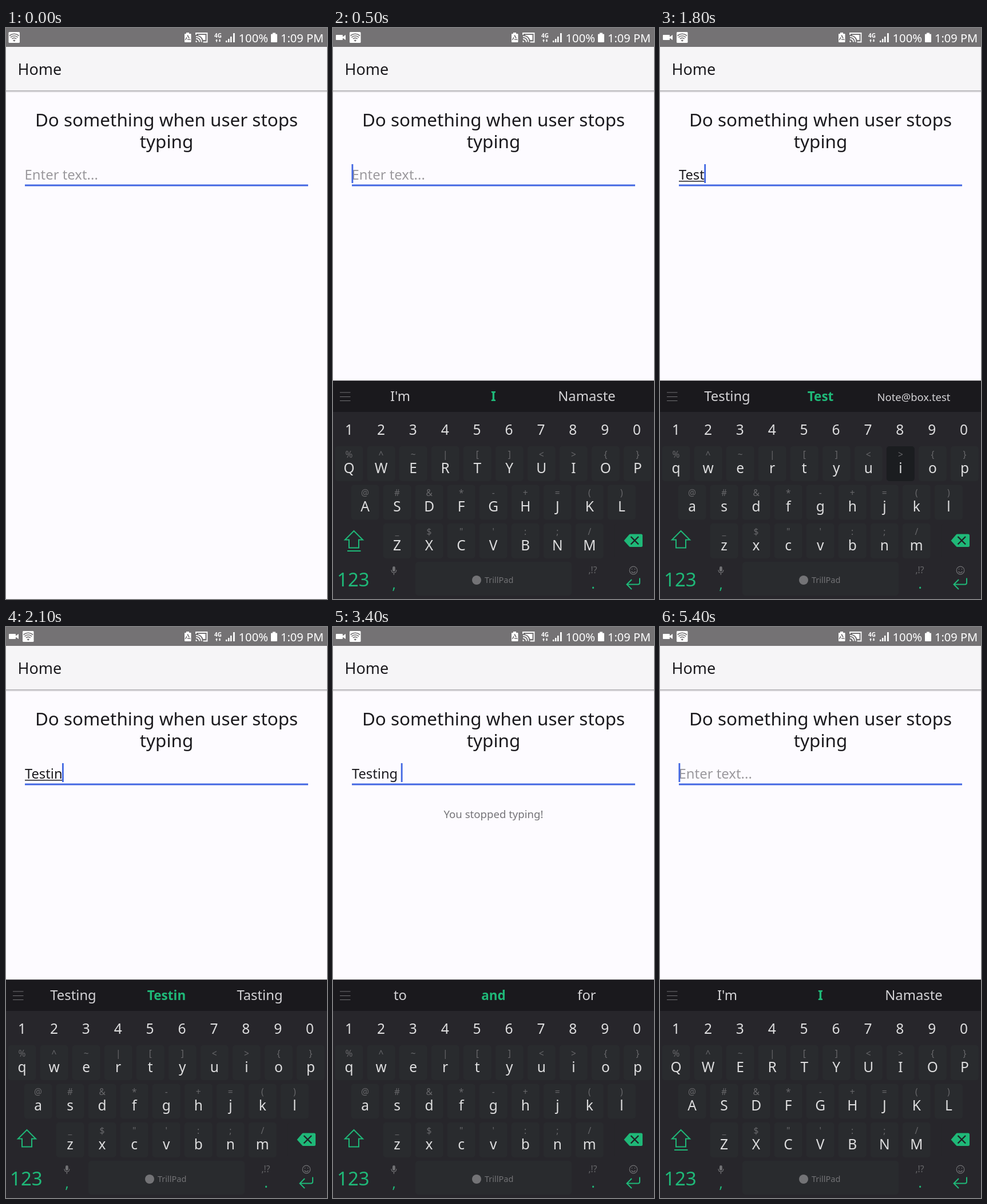
Animation, 561 px wide and 998 px high, one loop 5800 ms. Source, as an HTML page:

```html
<!DOCTYPE html>
<html lang="en">
<head>
<meta charset="utf-8">
<title>Typing pause demo</title>
<style>
  html, body { margin: 0; width: 100%; height: 100%; overflow: hidden; background: #fdfbff; }
  svg { display: block; }
  text { font-family: "Noto Sans", "Open Sans", sans-serif; white-space: pre; }
  .mid { text-anchor: middle; }
  .letter { font-size: 24.5px; fill: #dededf; }
  .symbol { font-size: 15.5px; fill: #68686b; }
  .brand { font-size: 14.5px; fill: #737376; }
  .green { fill: #1fb878; }
  .line { fill: none; stroke: #1fb878; stroke-width: 2; }
  .grey { fill: none; stroke: #717174; stroke-width: 1.2; }
</style>
</head>
<body>
<svg width="561" height="998" viewBox="0 0 561 998">
  <defs>
    <linearGradient id="shade" x2="0" y2="1">
      <stop stop-color="#aaa9ac"/><stop offset="1" stop-color="#fdfbff"/>
    </linearGradient>
  </defs>
  <rect width="561" height="998" fill="#fdfbff"/>

  <!-- status bar -->
  <rect width="561" height="33" fill="#747274"/>
  <path id="video" fill="#fff" d="M6 12h10q1 0 1 1v2.500l5-3.500v9l-5-3.500v2.500q0 1-1 1h-10q-1 0-1-1v-7q0-1 1-1z"/>
  <g id="wifi" fill="none" stroke="#747274" stroke-width="1.600">
    <rect x="4.500" y="7" width="19.500" height="19" rx="1.500" fill="#fff" stroke="none"/>
    <path d="M6 13.500q8.300-6.500 16.600 0M8 16.300q6.300-5 12.600 0M10.300 19q4-3.200 8 0"/>
    <path d="M12 21.200q2.300-1.600 4.600 0l-2.300 2.800z" fill="#747274" stroke="none"/>
  </g>
  <g fill="#fff">
    <path d="M315 8h5v2h2.500q1 0 1 1v13q0 1-1 1h-9.500q-1 0-1-1v-13q0-1 1-1h2z"/>
    <path d="M317.700 13.500l3.700 6.500h-7.400z" fill="none" stroke="#747274" stroke-width="1.700" stroke-dasharray="5 2"/>
    <path d="M332 12v-3h19.500v15.500h-7M332 14.800q9.500 .5 9.800 9.700M332 18.600q5.800 .4 6 5.900" fill="none" stroke="#fff" stroke-width="1.800"/>
    <path d="M336 12h12.500v9h-4q-2-6.500-8.500-8zM331.500 22q2.500 .2 2.700 2.700h-2.700z"/>
    <text x="364" y="17" font-size="10" font-weight="700">4G</text>
    <path d="M366 22l2-2.500 2 2.500h-1.200v2.500h-1.600v-2.500zM371.500 22h1.200v-2.500h1.600v2.500h1.200l-2 2.500z"/>
    <path d="M384 22h2.500v3h-2.500zM388 19h2.500v6h-2.500zM392 15h2.500v10h-2.500zM397 9h2.800v16h-2.800z"/>
    <text x="406.500" y="24.500" font-size="20.300">100%</text>
    <path d="M466 8.500h5v2h2q1 0 1 1v12.500q0 1-1 1h-9q-1 0-1-1v-12.500q0-1 1-1h2z"/>
    <text x="480" y="24.500" font-size="20">1:09 PM</text>
  </g>

  <!-- page -->
  <rect y="33" width="561" height="76" fill="#f6f5f7"/>
  <rect y="109" width="561" height="4" fill="url(#shade)"/>
  <g fill="#1b1a1e">
    <text x="20.500" y="82" font-size="27">Home</text>
    <text x="280.500" y="172" font-size="31.400" class="mid">Do something when user stops</text>
    <text x="280.500" y="210" font-size="31.400" class="mid">typing</text>
    <text id="hint" x="32.500" y="264.500" font-size="23.900" fill="#9b999d">Enter text...</text>
    <text id="typed" x="33" y="264.500" font-size="23.700"></text>
    <rect id="compose" x="33" y="267" height="1.500"/>
  </g>
  <rect x="33" y="273.500" width="495" height="3" fill="#4267e2"/>
  <rect id="caret" y="238" width="2.800" height="33" fill="#4267e2"/>
  <text id="notice" x="280.500" y="334" font-size="18.600" class="mid" fill="#757478">You stopped typing!</text>

  <!-- keyboard -->
  <g id="board">
    <rect y="616.500" width="561" height="382" fill="#27262b"/>
    <rect y="616.500" width="561" height="54.500" fill="#1a191d"/>
    <path class="grey" d="M12 637h18.500M12 644.500h18.500M12 651.500h18.500"/>
    <g id="words"></g>
    <g id="keys"></g>
    <path class="line" d="M36.500 879l15.500 15.500h-7v14h-17v-14h-7z"/>
    <path id="lock" class="line" d="M25 914h23.500"/>
    <path class="green" d="M508.500 896l9-10.500q1-1 2-1h19q2.500 0 2.500 2.500v17.500q0 2.500-2.500 2.500h-19q-1 0-2-1z"/>
    <path d="M520.500 889l13.500 13.500M534 889l-13.500 13.500" stroke="#202226" stroke-width="2.400"/>
    <text class="green" x="7" y="976" font-size="33">123</text>
    <rect x="104" y="941" width="4.800" height="9" rx="2.400" fill="#717174"/>
    <path class="grey" d="M102 947q0 5 4.400 5t4.400-5M106.400 952v4"/>
    <text class="green mid" x="106.500" y="981" font-size="25">,</text>
    <circle cx="251" cy="965" r="8" fill="#737376"/>
    <text class="brand" x="265" y="970">TrillPad</text>
    <text class="symbol mid" x="454" y="953">,!?</text>
    <text class="green mid" x="454.500" y="980" font-size="25">.</text>
    <circle class="grey" cx="525" cy="948" r="6.800"/>
    <path class="grey" d="M521.500 950q3.500 4 7 0M522.500 945v1.500M527.500 945v1.500"/>
    <path class="line" d="M536 961.500v8q0 3-3 3h-19M522 964l-8.500 8.500 8.500 8.500"/>
  </g>
</svg>
<script>
const LOOP = 5800;
const $ = id => document.getElementById(id);
const keys = {}, letters = [];

function add(parent, tag, attrs, text = "") {
  const node = document.createElementNS("http://www.w3.org/2000/svg", tag);
  for (const name in attrs) node.setAttribute(name, attrs[name]);
  node.textContent = text;
  return parent.appendChild(node);
}

function addKey(name, x, y, width, height, fill) {
  const rect = add($("keys"), "rect", { x, y, width, height, rx: 5 });
  keys[name] = { rect, fill };
}

[..."1234567890"].forEach((digit, i) =>
  add($("keys"), "text", { x: 28 + 55.9 * i, y: 711, class: "letter mid" }, digit));

[
  ["qwertyuiop", "%^~|[]<>{}", 28, 731],
  ["asdfghjkl", "@#&*-+=()", 56, 798.5],
  ["zxcvbnm", "_$\"':;/", 112, 866]
].forEach(([row, symbols, left, y]) => [...row].forEach((name, i) => {
  const x = left + 56.05 * i;
  addKey(name, x - 24.5, y, 49, 61, "#292b2e");
  add($("keys"), "text", { x, y: y + 19.5, class: "symbol mid" }, symbols[i]);
  letters.push([name, add($("keys"), "text", { x, y: y + 46.5, class: "letter mid" })]);
}));
addKey("space", 144, 933, 273, 59, "#292b2e");
addKey("delete", 491.5, 866, 66, 61, "#27262b");

const words = [117.5, 280.5, 443.5].map((x, i) => add($("words"), "text", {
  x, y: 652, class: "mid",
  fill: i == 1 ? "#1fb878" : "#d4d3d6",
  "font-weight": i == 1 ? 700 : 400
}));

// Each step changes only the listed parts of the state.
const START = "I'm|I|Namaste", NEXT = "to|and|for";
const steps = [
  [0, { text: "", key: "", caps: true, caret: false, notice: false, board: false, compose: false, video: 0, words: START }],
  [100, { video: 0.5 }],
  [200, { video: 1 }],
  [300, { caret: true }],
  [500, { board: true }],
  [800, { caret: false }],
  [1100, { key: "t", caret: true }],
  [1200, { text: "T", key: "e", caps: false, compose: true, words: "The|T|This" }],
  [1300, { text: "Te", key: "", words: "Tell|Te|Text" }],
  [1400, { key: "s" }],
  [1500, { text: "Tes", key: "t", words: "Test|Tes|Tests" }],
  [1600, { text: "Test", key: "", words: "Testing|Test|Note@box.test" }],
  [1800, { key: "i" }],
  [1900, { text: "Testi", key: "", words: "Testing|Testi|Testify" }],
  [2000, { key: "n" }],
  [2100, { text: "Testin", key: "", words: "Testing|Testin|Tasting" }],
  [2200, { key: "g" }],
  [2300, { text: "Testing", key: "space", words: "Testing's|Testing|Tested" }],
  [2400, { text: "Testing ", key: "", compose: false, words: NEXT }],
  [2900, { caret: false }],
  [3000, { notice: true }],
  [3400, { caret: true }],
  [3800, { key: "delete" }],
  [3900, { text: "Testing" }],
  [4300, { text: "" }],
  [4400, { caps: true, notice: false, words: START }],
  [4600, { key: "" }],
  [4900, { caret: false }],
  [5400, { caret: true }]
];

function show(id, on) {
  $(id).style.display = on ? "" : "none";
}

function draw(time) {
  const state = Object.assign({}, ...steps.filter(step => step[0] <= time).map(step => step[1]));
  $("video").setAttribute("opacity", state.video);
  $("wifi").setAttribute("transform", `translate(${24.5 * state.video})`);
  $("typed").textContent = state.text;
  const width = state.text ? $("typed").getComputedTextLength() : 0;
  $("caret").setAttribute("x", 32.5 + width);
  $("compose").setAttribute("width", width);
  show("hint", !state.text);
  show("lock", state.caps);
  for (const id of ["caret", "notice", "board", "compose"]) show(id, state[id]);

  for (const name in keys)
    keys[name].rect.setAttribute("fill", name == state.key ? "#1b1d20" : keys[name].fill);
  for (const [name, label] of letters)
    label.textContent = state.caps ? name.toUpperCase() : name;
  state.words.split("|").forEach((word, i) => {
    words[i].textContent = word;
    words[i].setAttribute("font-size", i == 1 ? 22.5 : word.length > 10 ? 18.4 : 23.8);
  });
}

const begin = performance.now();
function tick() {
  draw((performance.now() - begin) % LOOP);
  requestAnimationFrame(tick);
}
tick();
</script>
</body>
</html>
```
